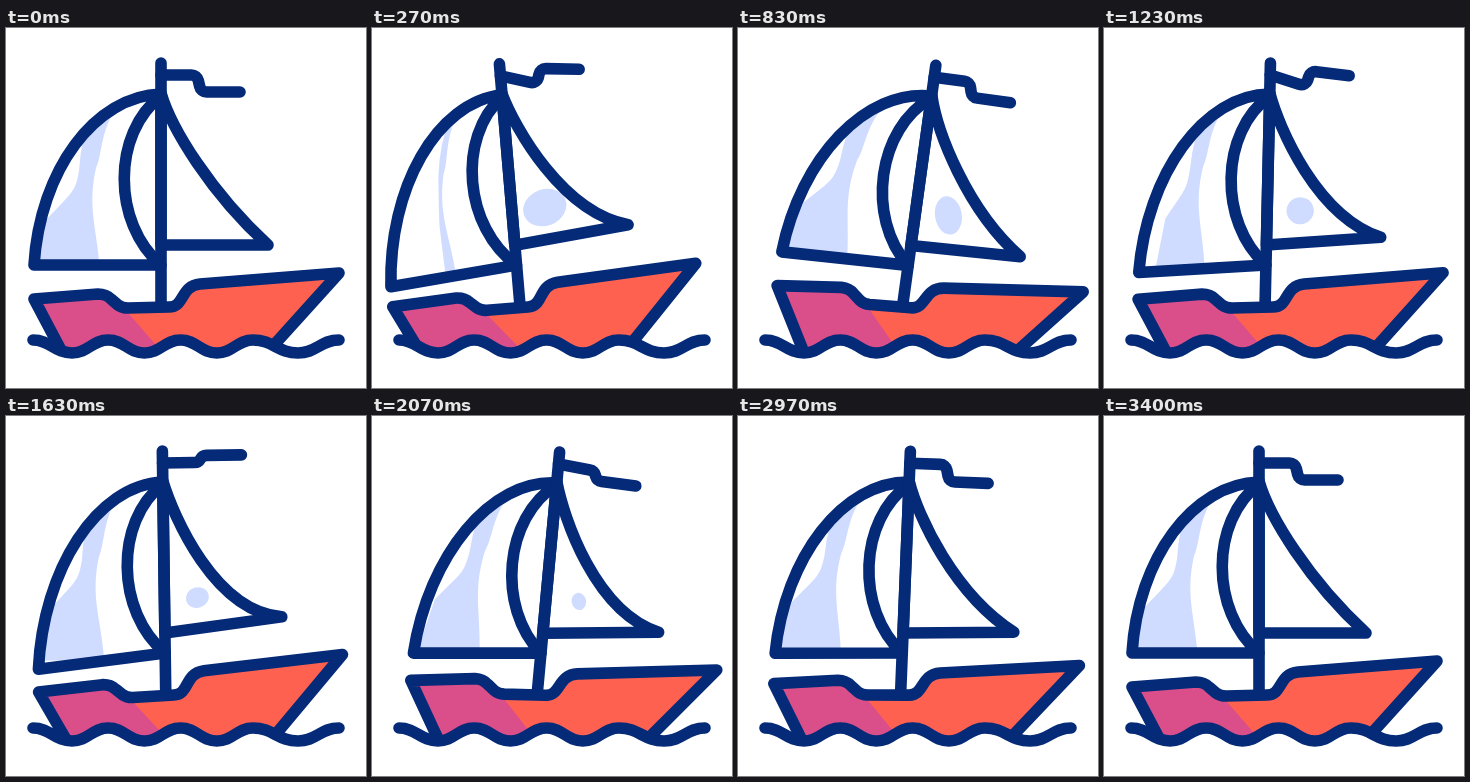
An HTML page with a canvas that plays this animation: 360 by 360 pixels, repeating every 3500 ms.

```html
<!DOCTYPE html>
<html lang="en">
<head>
<meta charset="utf-8">
<title>Sailing boat</title>
<style>
html, body { margin: 0; width: 100%; height: 100%; overflow: hidden; background: #fff; }
canvas { display: block; width: 360px; height: 360px; }
</style>
</head>
<body>
<canvas id="stage" width="360" height="360"></canvas>
<script>
const ctx = document.getElementById('stage').getContext('2d');
const NAVY = '#042a78', CORAL = '#ff6150', PINK = '#da4e8a', SHEEN = '#d0dcff';
const LOOP = 3500, STEP = 100 / 3, HALF_SWING = 480, RAD = Math.PI / 180;

const clamp = u => Math.min(1, Math.max(0, u));
const ease = u => (1 - Math.cos(Math.PI * u)) / 2;
const snap = u => ease(ease(u));
const mix = (a, b, u) => a + (b - a) * u;

// Rocks from one turning point to the next, one per half swing.
const sway = (turns, easing = ease) => t => {
  const p = Math.min(Math.max(t, 0) / HALF_SWING, turns.length - 1.001);
  const i = Math.floor(p);
  return mix(turns[i], turns[i + 1], easing(p - i));
};

const roll = sway([0, -5.6, 8.3, -5.5, 4, -1, 1.6, 0]);
const tilt = sway([0, -8.3, 11, -5, 7, -1, 2.5, 0]);
const drift = sway([0, -4, 2, 9, 6, 6.5, 6, 0]);
const wind = sway([0, 1.6, 0.1, 1.4, 1, 1.1, 0.5, 0]);
const flutter = sway([17, -16, 17, -16, 17, -16, 17, 17], snap);

// Even swells, with a longer last one.
function waveLine() {
  const turns = Array.from({ length: 6 }, (_, i) => 66 + 36.2 * i).concat(292, 333);
  let d = 'M27 312', x = 27, y = 312;
  turns.forEach((nx, i) => {
    const ny = i % 2 ? 312 : 325, h = (nx - x) * 0.45;
    d += `C${x + h} ${y} ${nx - h} ${ny} ${nx} ${ny}`;
    [x, y] = [nx, ny];
  });
  return d;
}

const WAVE = waveLine();
const wave = new Path2D(WAVE);
const aboveWater = new Path2D(WAVE + 'L360 312V0H0V312Z');
const hull = new Path2D('M28 271L92 266Q100 266 105 271L112 277Q116 280 122 280L163 279' +
  'C179 279 174 258 194 256L333 245L240 348L65 341Z');
const bow = new Path2D('M0 250H92L175 346H0Z');

function clipped(shape, draw) {
  ctx.save();
  ctx.clip(shape);
  draw();
  ctx.restore();
}

function fill(path, color) {
  ctx.fillStyle = color;
  ctx.fill(path);
}

function drawHull(shift, angle) {
  clipped(aboveWater, () => {
    ctx.translate(160 + shift, 360);
    ctx.rotate(angle);
    ctx.translate(-160, -360);
    fill(hull, CORAL);
    clipped(hull, () => fill(bow, PINK));
    ctx.stroke(hull);
  });
}

// Light patch: its left side closes in on the right one with each fading gust.
function sheen(t) {
  const gust = Math.max(0, Math.sin(Math.PI * (t + 20) / HALF_SWING));
  const full = 1 - 1.25 * Math.exp(-t / 900) * gust * clamp(t / 200) * (t < 3300);
  const at = (right, left, y) => `${mix(right, left, full)} ${y}`;
  return new Path2D('M-42 -200C-62 -170 -58 -150 -65 -135C-74 -95 -64 -75 -61 -32' +
    `L${at(-64, -130, -32)}L${at(-68, -116, -82)}` +
    `C${at(-70, -88, -112)} ${at(-70, -86, -110)} ${at(-69, -82, -132)}` +
    `Q${at(-65, -80, -165)} ${at(-52, -70, -190)}Z`);
}

function spot(t) {
  const size = Math.max(0, 22 - t * 0.0068) * ease(clamp(t / 200)) * clamp((2900 - t) / 200);
  const squash = roll(t) * 0.03;
  const path = new Path2D();
  path.ellipse(33, -93, size * (1 - squash), size * (1 + squash), -0.3, 0, 2 * Math.PI);
  return path;
}

function drawSails(t) {
  const w = wind(t);
  const main = new Path2D(`M0 -209C-66 -207 -121 ${-133 + 8 * w} -127 ${-38 + 11.5 * w}` +
    'L0 -38C-49 -80 -49 -170 0 -207');
  const jib = new Path2D(`M0 -210C10 -175 50 ${-110 + 25 * w}` +
    ` ${107 + 8 * w} ${-58 - 11.5 * w}L0 -58Z`);
  clipped(main, () => fill(sheen(t), SHEEN));
  clipped(jib, () => fill(spot(t), SHEEN));
  ctx.stroke(main);
  ctx.stroke(jib);
}

// The near end dips while the far end is whipped upwards.
function drawFlag(t) {
  const far = flutter(t);
  const near = Math.max(0, flutter(t - 40) - flutter(t + 40)) ** 2 / 15;
  const end = far + near * 0.4;
  ctx.save();
  ctx.translate(0, -228);
  ctx.beginPath();
  ctx.moveTo(0, 0);
  ctx.arcTo(36, near * 1.1, 40, far, 7);
  ctx.arcTo(40, far, 79, end, 7);
  ctx.lineTo(79, end);
  ctx.stroke();
  ctx.restore();
}

function draw(t) {
  const shift = drift(t), angle = roll(t) * RAD;
  ctx.fillStyle = '#fff';
  ctx.fillRect(0, 0, 360, 360);
  ctx.strokeStyle = NAVY;
  ctx.lineWidth = 11.6;
  ctx.lineCap = ctx.lineJoin = 'round';

  ctx.save();
  ctx.translate(155 + shift + 85 * Math.sin(angle), 275);
  ctx.rotate(tilt(t) * RAD);
  drawSails(t);
  drawFlag(t);
  ctx.stroke(new Path2D('M0 -240V0'));
  ctx.restore();

  drawHull(shift, angle);
  ctx.stroke(wave);
}

const start = performance.now();
function tick() {
  const t = (performance.now() - start) % LOOP;
  draw(Math.floor((t + 5) / STEP) * STEP % LOOP);
  requestAnimationFrame(tick);
}
tick();
</script>
</body>
</html>
```
